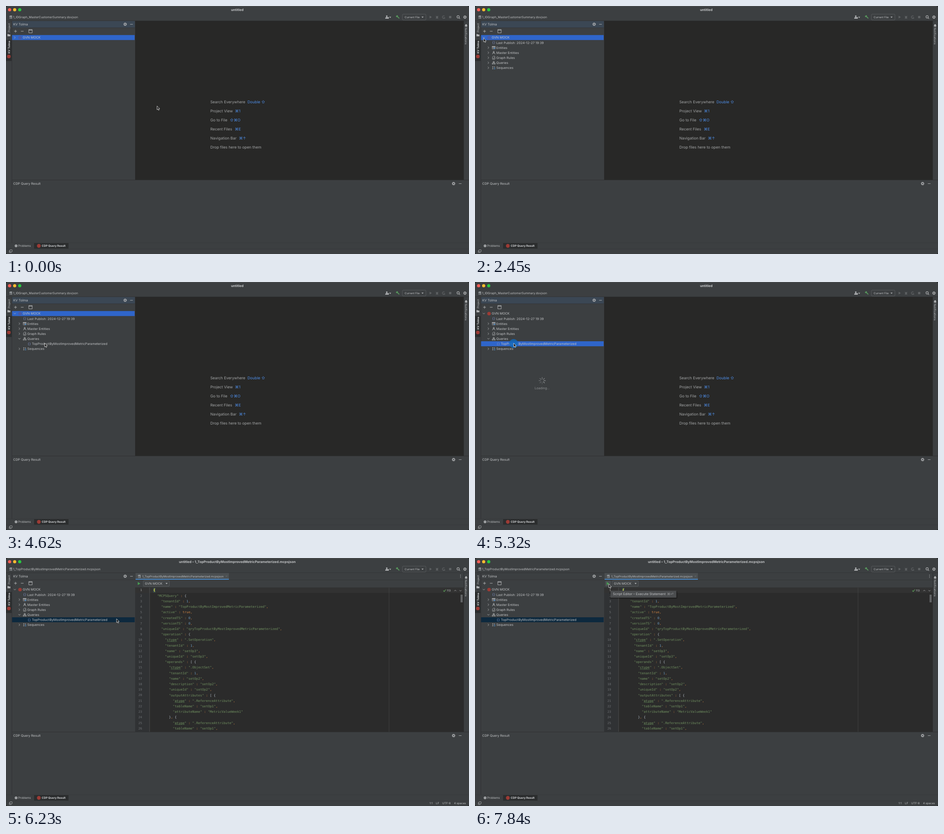
Recreate the animation shown at these times as an HTML page. Size 1022 by 548 pixels, loop 8 s.

```html
<!DOCTYPE html>
<html lang="en">
<head>
<meta charset="utf-8">
<title>IDE session</title>
<style>
html, body { margin: 0; width: 100%; height: 100%; overflow: hidden; background: #1c1d1e; }
svg { display: block; width: 100vw; height: 100vh; }
text { font-family: Inter, "DejaVu Sans", sans-serif; text-rendering: geometricPrecision; white-space: pre; }
.mono { font-family: "DejaVu Sans Mono", monospace; }
.s { fill: none; stroke: #afb1b3; stroke-width: .9; }
</style>
</head>
<body>
<svg id="stage" viewBox="0 0 1022 548" xmlns="http://www.w3.org/2000/svg"></svg>
<script>
const LOOP = 8000, STEP = 70;
const FG = '#c1c3c5', ICON = '#afb1b3', BG = '#3c3f41', LINE = '#2d2f30', RED = '#9c3b35';
const APP = 'KV Tolma', TENANT = 'GVN MOCK', QUERY = 'TopProductByMostImprovedMetricParameterized';
const FILE = `1_${QUERY}.mcpsjson`;

const text = (x, y, s, size = 7.15, fill = FG, more = '') =>
  `<text x="${x}" y="${y}" font-size="${size}" fill="${fill}" ${more}>${s}</text>`;
const rect = (x, y, w, h, fill, more = '') =>
  `<rect x="${x}" y="${y}" width="${w}" height="${h}" fill="${fill}" ${more}/>`;
const dot = (x, y, r, fill, more = '') => `<circle cx="${x}" cy="${y}" r="${r}" fill="${fill}" ${more}/>`;
const path = (d, more = '') => `<path class="s" d="${d}" ${more}/>`;
const solid = (d, fill, more = '') => `<path d="${d}" fill="${fill}" ${more}/>`;
const group = (id, body) => `<g id="${id}">${body}</g>`;
const at = (x, y, body, turn = 0) => `<g transform="translate(${x} ${y}) rotate(${turn})">${body}</g>`;

const gear = (x, y) => at(x, y, dot(0, 0, 2.1, 'none', `stroke="${ICON}" stroke-width="1.4"`) +
  dot(0, 0, 3.2, 'none', `stroke="${ICON}" stroke-width="1.2" stroke-dasharray="1.25 1.26"`));
const minus = (x, y) => path(`M${x - 3} ${y}h6`);
const down = (x, y) => solid(`M${x - 2.3} ${y - 1.2}h4.6l-2.3 2.8z`, ICON);
const chevron = (x, y, open) => at(x, y, path('M-1.3 -2.2L1 0L-1.3 2.2'), open ? 90 : 0);
const fileIcon = (x, y) => at(x, y, solid('M-1.5 -3.5h4.5v7h-6v-5.5z', '#8f9497') +
  rect(-3.4, -.6, 4.6, 3.4, BG) + path('M-2.6 .2h3M-2.6 1.8h3', 'style="stroke-width:.7"'));
const braces = (x, y) => text(x, y + 2.3, '{}', 7, '#7d8fc4', 'class="mono" text-anchor="middle" letter-spacing="-.6"');

function chrome() {
  const lights = ['#fe5f57', '#febc2e', '#28c840'].map((c, i) => dot(8 + i * 11.15, 8.2, 3.5, c)).join('');
  return rect(0, 0, 1022, 548, BG, 'rx="4"') + path('M4 .5H1018', 'style="stroke:#5a5d5f;stroke-width:.6"') + lights +
    rect(0, 32.4, 1022, .8, LINE) + rect(12.6, 33, .8, 490, LINE) + rect(1010, 33, .8, 352, LINE) +
    rect(13, 384, 1009, .8, LINE) + rect(0, 523, 1022, .6, '#343638') + rect(0, 536.6, 1022, .6, '#343638') +
    fileIcon(10.5, 24.5) +
    // run toolbar
    dot(840.5, 22.4, 1.7, ICON) + solid('M837 28c0-5 7-5 7 0z', ICON) + rect(843, 24.5, 2, 3.5, ICON) + down(848, 25) +
    solid('M860.5 22.5l3-2.3 2 1.4-.7 1.2 4 4-1.3 1.3-4.3-4.2-1.2 1z', '#57965c') +
    rect(875, 18, 52, 13, 'none', 'rx="2" stroke="#5e6163" stroke-width=".8"') +
    text(880, 26.8, 'Current File', 6) + down(919.5, 24.7) +
    solid('M935 21.5l5 3-5 3z', '#5d6062') +
    `<ellipse cx="951.5" cy="25" rx="2.2" ry="3" fill="#5d6062"/>` +
    path('M948.3 22l6.4 6M954.7 22l-6.4 6', 'style="stroke:#5d6062;stroke-width:.8"') +
    path('M968 22.5a2.8 2.8 0 1 0 0 4', 'style="stroke:#5d6062;stroke-width:1.2"') + solid('M966.5 24.5l3.6 2-3.6 2z', '#5d6062') +
    rect(978, 22, 5, 5, '#5d6062') +
    dot(998, 24, 2.6, 'none', `stroke="${ICON}" stroke-width="1.1"`) + path('M1000 26l2.2 2.2', 'style="stroke-width:1.2"') +
    gear(1013, 24.6) +
    // side strips
    rect(0, 75, 12.6, 46.5, '#2b2d2e') +
    at(8.6, 58, text(0, 0, 'Project', 6), -90) + solid('M3.3 62h2.6l.8 1h3v4H3.3z', ICON) +
    at(8.6, 105, text(0, 0, APP, 6.1, '#e4e6e8', 'font-weight="600"'), -90) + dot(6.3, 111.5, 4, RED) +
    at(1013.4, 48, text(0, 0, 'Notifications', 6.2), 90) +
    solid('M1012.6 45c1-1 .8-5 3-5s2 4 3 5z', ICON) + dot(1015.6, 45.6, .9, ICON) +
    // bottom tool window
    text(16, 395, 'CDP Query Result') + gear(988, 392.4) + minus(1002.5, 392.5) +
    dot(22.2, 530, 2.9, ICON) + rect(21.8, 528.2, .8, 2.2, BG) + rect(21.8, 531, .8, .8, BG) +
    text(27, 532.3, 'Problems', 6.25) + rect(62, 524, 76, 12, '#2b2d2e') +
    dot(72.5, 530, 4.2, RED) + text(79, 532.3, 'CDP Query Result', 6.1, '#e4e6e8', 'font-weight="600"') +
    rect(8.6, 538.6, 5, 4.6, 'none', `stroke="${ICON}" stroke-width=".8" rx=".6"`) + path('M7.2 540.4v4.4h4.6', 'style="stroke-width:.8"');
}

const rowY = i => 69.8 + i * 11.13;
const label = (i, x, s) => text(x, rowY(i) + 2.6, s);
const branch = (i, s, icon) => at(41.3, rowY(i), icon) + label(i, 47, s);

function sidebar() {
  const box = path('M-3.4 -2.8h6.8v5.6h-6.8zM-3.4 -1h6.8M-1.2 -1v3.8M1.2 -1v3.8', 'style="stroke-width:.7"') + rect(-3.7, -3.1, 7.4, 1.6, ICON) + rect(0, .2, 3.4, 2.6, '#4f86b8');
  const person = path('M-3 3.3L-1 -1h2l2 4.3M-1.6 .8h3.2') + dot(0, -2.3, 1.2, 'none', `stroke="${ICON}" stroke-width=".8"`);
  const rules = path('M-2.8 3.2v-5l2-1.6h3.2v6.6z', 'style="stroke-width:.8"') + dot(1.3, 1.5, 1.8, BG, `stroke="${ICON}" stroke-width=".8"`);
  const chart = path('M-1.3 -3.2h2.6v2.2h-2.6zM-3.4 1h2.4v2.2h-2.4zM1 1h2.4v2.2H1zM0 -1v1M-2.2 1V0h4.4v1', 'style="stroke-width:.8"');
  const steps = path('M-2 -3v6M-3.3 -1.7l1.3-1.4 1.3 1.4M-3.3 1.7l1.3 1.4 1.3-1.4', 'style="stroke-width:.8"') + rect(.8, -3, 1.6, 1.6, ICON) + rect(.8, -.6, 2.4, 1.5, '#4f86b8') + rect(.8, 1.8, 2.4, 1.5, '#4f86b8');
  return group('focus', rect(13.4, 33.2, 271, 14.6, '#3b4754')) + rect(13.4, 47.8, 271, .6, LINE) +
    text(16, 43, APP, 7.2) + gear(263, 40.3) + minus(277, 40.4) +
    path('M18 55.8h6M21 52.8v6M32.8 55.8h6', 'style="stroke-width:1"') +
    path('M50.3 52h7.6v7.4h-7.6zM50.3 53.4h7.6', 'style="stroke-width:1"') +
    `<rect id="sel" x="13.4" width="270.6" height="11"/>` +
    group('rootClosed', chevron(19.5, rowY(0), false)) + group('rootOpen', chevron(19.5, rowY(0), true)) +
    dot(31, rowY(0), 3.9, RED, 'id="rootIcon"') + label(0, 37, TENANT) +
    group('tree',
      braces(41, rowY(1)) + label(1, 47, 'Last Publish: 2024-12-27 19:39') +
      [2, 3, 4].map(i => chevron(29.6, rowY(i), false)).join('') +
      branch(2, 'Entities', box) + branch(3, 'Master Entities', person) + branch(4, 'Graph Rules', rules) + branch(5, 'Queries', chart) +
      group('queriesClosed', chevron(29.6, rowY(5), false)) +
      group('queriesOpen', chevron(29.6, rowY(5), true) + braces(51, rowY(6)) + label(6, 57, QUERY)) +
      group('last', chevron(29.6, rowY(6), false) + branch(6, 'Sequences', steps))) +
    group('loading', at(148.3, 218, group('spinner', '')) +
      text(148.3, 237.4, 'Loading...', 7.15, '#8e9193', 'text-anchor="middle"'));
}

function welcome() {
  const tips = [['Search Everywhere', 'Double ⇧', 533], ['Project View', '⌘1', 505.5], ['Go to File', '⇧⌘O', 494],
    ['Recent Files', '⌘E', 505], ['Navigation Bar', '⌘↑', 514.3], ['Drop files here to open them', '', 0]];
  return rect(285, 33, 725, 351, '#282827') + tips.map(([name, keys, x], i) =>
    text(451, 215.4 + i * 20, name, 8.4, '#a4a6a7') + text(x, 215.4 + i * 20, keys, 8.4, '#4f8fea')).join('');
}

const CHAR = 4.305, PITCH = 12.22;
const source = `{
  "MCPSQuery" : {
    "tenantId" : 1,
    "name" : "${QUERY}",
    "active" : true,
    "createdTS" : 0,
    "versionTS" : 0,
    "uniqueId" : "qry${QUERY}",
    "operation" : {
      "ctype" : ".SetOperation",
      "tenantId" : 1,
      "name" : "setOp3",
      "uniqueId" : "setOp3",
      "operands" : [ {
        "ctype" : ".ObjectSet",
        "tenantId" : 1,
        "name" : "setOp2",
        "description" : "setOp2",
        "uniqueId" : "setOp2",
        "outputAttributes" : [ {
          "atype" : ".ReferenceAttribute",
          "tableName" : "setOp1",
          "attributeName" : "MetricValueWeek1"
        }, {
          "atype" : ".ReferenceAttribute",
          "tableName" : "setOp1",`.split('\n');

const colour = s => s.startsWith('"') ? '#709060' : /^\d/.test(s) ? '#6f9cc0' : /^(true|[:,])/.test(s) ? '#cc8242' : '#b6c0ca';
const paint = s => s.replace(/"[^"]*"|\d+|true|[:,]|[^"\d:,]/g, m => `<tspan fill="${colour(m)}">${m}</tspan>`);

function code(rich) {
  return source.map((line, i) => {
    const body = line.trimStart(), x = 325.2 + (line.length - body.length) * CHAR, y = 73.4 + i * PITCH;
    let out = text(x, y, rich ? paint(body) : body, 7.15, '#c6ced6', 'class="mono"');
    if (rich && /^"[ac]type/.test(body))
      out += path(`M${x + CHAR} ${y + 1.6}` + 'l1.08 -1l1.08 1'.repeat(10), 'style="stroke:#6b9a62;stroke-width:.6"');
    return out;
  }).join('');
}

function editor() {
  const numbers = source.map((_, i) =>
    text(300.4, 73.3 + i * PITCH, i + 1, 6.8, i ? '#6e7174' : '#a4a3a3', 'class="mono" text-anchor="end"')).join('');
  const gutter = edge => rect(285, 65.5, edge - 285, 318.5, '#303234') + rect(285, 65.5, 725, 11.5, '#323232') +
    rect(edge, 65.5, .7, 318.5, '#5a5c5e');
  const thumb = y => rect(1003.4, y, 4.6, 17, '#626466');
  return rect(285, 33, 725, 32.5, BG) + rect(286, 33.2, 206, 14.6, '#4b4f51') + rect(286, 46, 206, 2, '#4a88c7') +
    rect(285, 48, 725, .6, LINE) +
    text(301, 42.7, FILE, 6.2) + path('M485.2 38.6l3 3M488.2 38.6l-3 3', 'style="stroke:#6e7173;stroke-width:.7"') +
    [37.5, 40.3, 43.1].map(y => dot(1003.3, y, .75, ICON)).join('') +
    rect(303, 50, 57.5, 12.6, '#414446', 'rx="1.5" stroke="#5e6163" stroke-width=".8"') + text(306.6, 59, TENANT, 7) + down(354.5, 56.3) +
    rect(285, 65.5, 725, 318.5, '#2b2b2b') +
    group('plain', gutter(322.8) + code(false) + thumb(66)) +
    group('rich', gutter(316.6) + fileIcon(294, 40.5) + rect(324.8, 66.2, 5, 10, '#3b514d') + code(true) +
      text(325.2, 73.4, '{', 7.15, '#ffef28', 'class="mono" font-weight="700"') +
      group('hover', rect(287.5, 50.5, 12.5, 12, '#4c5052', 'rx="2"')) + solid('M290.8 53l5.8 3.4-5.8 3.4z', '#499c54') +
      thumb(81) +
      path('M965.5 72l1.8 2 3.6-4.5', 'style="stroke:#5fa85a;stroke-width:1.2"') + text(973, 74.2, '113', 6) +
      path('M989.5 73.2l2.2-2.3 2.2 2.3M1001 71l2.2 2.3 2.2-2.3', 'style="stroke-width:.8"') +
      [[935, '1:1'], [949, 'LF'], [963, 'UTF-8'], [989, '4 spaces']].map(([x, s]) => text(x, 544, s, 6.05)).join('')) +
    rect(845, 65.5, .8, 318.5, '#454647') + numbers;
}

const tooltip = () => rect(297.5, 73, 149, 17, '#000', 'opacity=".3" rx="2"') +
  rect(299, 72.4, 145.5, 15.2, '#4b4d4f') +
  text(304.3, 82.4, 'Script Editor – Execute Statement', 7.4) + text(424, 82.4, '⌘⏎', 7.1, '#999b9d');

const stage = document.getElementById('stage');
stage.innerHTML = chrome() + text(15.5, 27, '', 6.66, FG, 'id="crumb"') +
  text(510.5, 10.8, '', 7.37, '#c3c5c7', 'id="title" font-weight="700" text-anchor="middle"') +
  sidebar() + group('welcome', welcome()) + group('editor', editor()) + group('tip', tooltip()) +
  dot(0, 0, 10, '#1268b8', 'id="click" opacity=".82"') +
  group('cursor', solid('M0 0V8.2L1.9 6.5L3.2 9.4L4.7 8.7L3.4 5.9H5.9Z', '#111', 'stroke="#f2f2f2" stroke-width=".8" stroke-linejoin="round"'));

const el = {};
stage.querySelectorAll('[id]').forEach(n => el[n.id] = n);
el.spinner.innerHTML = Array.from({ length: 8 }, (_, i) =>
  `<path d="M0 -3.6V-7.2" stroke="#8e9193" stroke-width="1.4" stroke-linecap="round" transform="rotate(${i * 45})"/>`).join('');
const show = (id, on) => { el[id].style.display = on ? '' : 'none'; };

const EXPAND = 1960, QUERIES = 3850, PICK = 5110, OPEN = 5390, READY = 5880, HOVER = 7210, TIP = 7700;
const clicks = [[1820, 2170], [3780, 4060], [PICK, 5740]];
// time, x, y of the pointer tip
const route = [[0, 333.4, 221], [700, 333.4, 221], [1470, 34, 69.8], [1680, 18.5, 68.5], [2310, 18.5, 68.5],
  [3360, 28.5, 124], [3920, 28.5, 124], [4480, 85.3, 135.2], [5810, 85.3, 135.2], [6230, 244, 134.4], [7350, 295.3, 57.5], [LOOP, 295.3, 57.5]];

function pointer(t) {
  const i = route.findIndex(p => p[0] > t), [t0, x0, y0] = route[i - 1], [t1, x1, y1] = route[i];
  const u = (t - t0) / (t1 - t0), k = u * u * (3 - 2 * u);
  return [x0 + (x1 - x0) * k, y0 + (y1 - y0) * k];
}

function draw(ms) {
  const t = Math.min(Math.floor(ms / STEP) * STEP, 7840);
  const tree = t >= EXPAND, queries = t >= QUERIES, picked = t >= PICK, open = t >= OPEN, ready = t >= READY;
  const [x, y] = pointer(t);
  show('rootClosed', !tree); show('rootOpen', tree); show('tree', tree);
  show('queriesClosed', !queries); show('queriesOpen', queries);
  el.last.setAttribute('transform', `translate(0 ${queries ? 11.13 : 0})`);
  el.sel.setAttribute('y', rowY(picked ? 6 : 0) - 5.6);
  el.sel.setAttribute('fill', open ? '#0d293e' : '#2f65ca');
  el.rootIcon.setAttribute('opacity', picked ? 1 : .22);
  show('focus', !ready);
  show('loading', t >= PICK + STEP && !ready);
  [...el.spinner.children].forEach((n, i) => n.setAttribute('opacity', .35 + .65 * ((i - t / STEP % 8 + 8) % 8) / 8));
  show('welcome', !open); show('editor', open);
  show('plain', !ready); show('rich', ready);
  el.title.textContent = open ? `untitled – ${FILE}` : 'untitled';
  el.crumb.textContent = ready ? FILE : '1_IDGraph_MasterCustomerSummary.dsvjson';
  show('hover', t >= HOVER); show('tip', t >= TIP);
  show('click', clicks.some(([a, b]) => t >= a && t < b));
  el.click.setAttribute('cx', x); el.click.setAttribute('cy', y + .8);
  el.cursor.setAttribute('transform', `translate(${x} ${y})`);
}

const start = performance.now();
(function tick() {
  draw((performance.now() - start) % LOOP);
  requestAnimationFrame(tick);
})();
</script>
</body>
</html>
```
